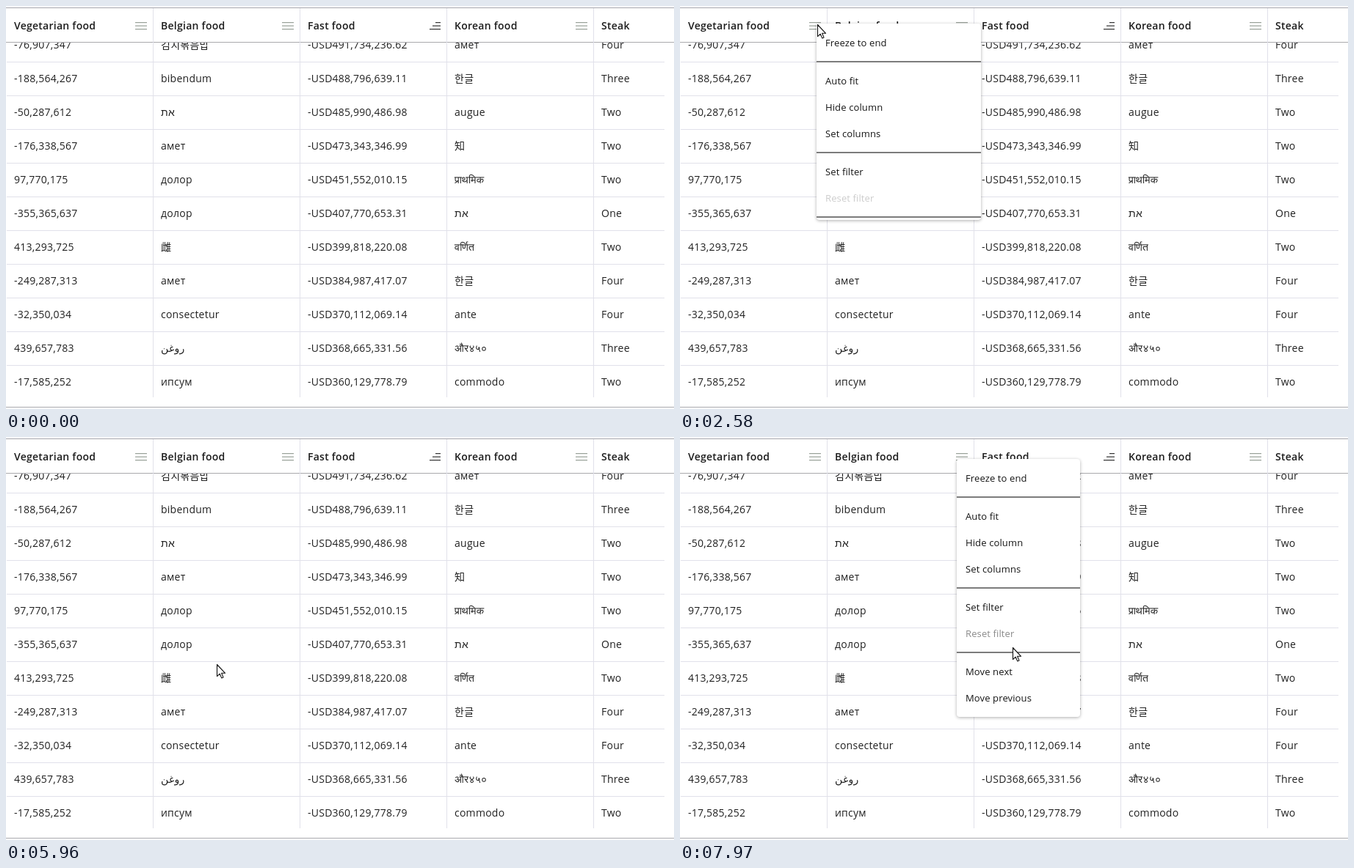
Animation, 910 px wide and 550 px high, one loop 8 s. Source, as an HTML page:

```html
<!DOCTYPE html>
<html lang="en">
<head>
<meta charset="utf-8">
<title>Column menu</title>
<style>
html, body { margin: 0; width: 100%; height: 100%; overflow: hidden; background: #fff; }
#stage {
  position: relative; width: 910px; height: 550px; overflow: hidden; background: #fff;
  font: 14px "Open Sans", "Noto Sans", "Noto Sans CJK KR", "Noto Sans CJK", sans-serif;
  letter-spacing: .25px; color: #212121; white-space: pre;
}
#stage div, #stage svg { position: absolute; }
.edge { left: 0; width: 910px; height: 1px; background: #a9a9ad; }
.strip { left: 0; top: 0; width: 910px; height: 2px; background: #f5f5fb; }
.col { top: 3px; width: 1px; height: 531px; background: #e1e1ea; }
#body { left: 1px; top: 50px; width: 896px; height: 484px; overflow: hidden; }
.row { left: 0; width: 896px; height: 45px; border-bottom: 1px solid #e1e1ea; }
.cell, .head { line-height: 44px; }
.head { top: 5px; font-weight: 600; color: #1c1c1c; }
.menu {
  overflow: hidden; background: #fff; border-radius: 4px;
  box-shadow: 0 1px 4px rgba(0, 0, 0, .32);
  font-size: 13px; letter-spacing: .122px; color: #151515;
}
.item { left: 0; width: 100%; height: 36px; line-height: 36px; text-indent: 12px; }
.item span { display: inline; }
.item.hover { background: #f3f3f3; }
.off { color: #8a8a8a; }
.mark { background: #ffc107; text-indent: 0; }
.rule { left: 0; width: 100%; height: 2px; background: #7c7c7c; }
#cursor { left: 0; top: 0; width: 0; height: 0; }
#cursor svg { overflow: visible; }
#cursor path { fill: #fff; stroke: #111; stroke-width: 1.1; stroke-linejoin: round; }
</style>
</head>
<body>
<div id="stage">
  <div class="strip"></div>
  <div id="body"></div>
  <div class="edge" style="top:2px"></div>
  <div class="edge" style="top:49px"></div>
  <div class="edge" style="top:547px"></div>
</div>
<script>
const LOOP = 8000, REVEAL = 308, MENU_H = 352;
const stage = document.getElementById('stage');
const body = document.getElementById('body');

const heads = ['Vegetarian food', 'Belgian food', 'Fast food', 'Korean food', 'Steak'];
const rows = `-76,907,347|김치볶음밥|-USD491,734,236.62|амет|Four
-188,564,267|bibendum|-USD488,796,639.11|한글|Three
-50,287,612|את|-USD485,990,486.98|augue|Two
-176,338,567|амет|-USD473,343,346.99|知|Two
97,770,175|долор|-USD451,552,010.15|प्राथमिक|Two
-355,365,637|долор|-USD407,770,653.31|את|One
413,293,725|雌|-USD399,818,220.08|वर्णित|Two
-249,287,313|амет|-USD384,987,417.07|한글|Four
-32,350,034|consectetur|-USD370,112,069.14|ante|Four
439,657,783|روغن|-USD368,665,331.56|और४५०|Three
-17,585,252|ипсум|-USD360,129,778.79|commodo|Two`.split('\n').map(r => r.split('|'));

function add(parent, cls, style, text) {
  const el = document.createElement('div');
  el.className = cls;
  for (const k in style) el.style[k] = style[k] + 'px';
  if (text) el.textContent = text;
  parent.append(el);
  return el;
}

function addSvg(parent, left, top, inner) {
  parent.insertAdjacentHTML('beforeend',
    `<svg width="20" height="24" style="left:${left}px;top:${top}px">${inner}</svg>`);
  return parent.lastElementChild;
}

rows.forEach((cells, i) => {
  const row = add(body, 'row', { top: 46 * i - 19 });
  cells.forEach((text, c) => add(row, 'cell', { left: 200 * c + 10 }, text));
});

heads.forEach((text, c) => {
  add(stage, 'head', { left: 200 * c + 11 }, text);
  if (c) add(stage, 'col', { left: 200 * c });
  if (c === 4) return;
  const sorted = c === 2;
  const bars = [0, 1, 2].map(k => {
    const x = sorted ? 8 - 4 * k : 0;
    return `<rect x="${x}" y="${k * 4.5}" width="${(sorted ? 15 : 16) - x}" height="1.2"/>`;
  }).join('');
  addSvg(stage, 200 * c + (sorted ? 177 : 176), 22,
    `<g fill="${sorted ? '#333' : '#98a098'}">${bars}</g>`);
});

// '-' is a divider, '~' a disabled item, '*' a marked one
const common = ['Freeze to end', '-', 'Auto fit', 'Hide column', 'Set columns', '-',
  'Set filter', '~Reset filter', '-'];

function makeMenu(left, top, width, open, close, extra) {
  const el = add(stage, 'menu', { left, top, width });
  const items = [];
  let y = 8;
  for (const name of [...common, ...extra]) {
    if (name === '-') {
      add(el, 'rule', { top: y + 7 });
      y += 16;
      continue;
    }
    const off = name[0] === '~', marked = name[0] === '*';
    const item = add(el, off ? 'item off' : 'item', { top: y });
    const span = document.createElement('span');
    span.textContent = name.replace(/^[~*]/, '');
    if (marked) span.className = 'mark';
    item.append(span);
    items.push({ item, y, off });
    y += 36;
  }
  return { el, items, left, top, width, open, close };
}

const menus = [
  makeMenu(186, 24, 224, 2370, 5690, ['*Only show in first column', 'Move next']),
  makeMenu(377, 30, 168, 7420, LOOP, ['Move next', 'Move previous'])
];

const cursor = add(stage, '', {});
cursor.id = 'cursor';
const arrow = addSvg(cursor, 0, 0, '<path d="M.5 .5V16.6L4.2 13.2 6.7 18.9 9 17.9 6.6 12.3H11.6Z"/>');
const hand = addSvg(cursor, -7, 0, `<path d="M5.2 2C5.2 0 8.2 0 8.2 2V8.2C8.2 6.6 11 6.7 11 8.6
  C11.2 7.2 13.8 7.4 13.8 9.2C14.2 8.2 16.6 8.5 16.6 10.4V16Q16.6 19 14.8 22H7.4
  Q6.6 19.4 3 15.2Q.2 12 1.2 11Q2.6 9.8 5.2 12.8Z"/>
  <path d="M8.2 8V12M11 8.6V12M13.8 9.2V12" style="fill:none"/>`);

// time, x, y of the pointer tip
const path = [
  [490, 568, 523], [1190, 4, 42], [1330, 4, 40], [1820, 160, 24], [1890, 160, 24],
  [2170, 180, 24], [2380, 187, 25], [2720, 187, 25], [2930, 285, 312], [3000, 286, 312],
  [3340, 290, 331], [3540, 290, 331], [3605, 284, 322], [4340, 284, 322], [4820, 287, 316],
  [5080, 287, 316], [5280, 287, 310], [6370, 287, 310], [6925, 362, 49], [7000, 362, 49],
  [7140, 371, 36], [7250, 378, 31], [7640, 378, 31], [7920, 453, 287], [LOOP, 453, 287]
];

const clamp = v => Math.min(1, Math.max(0, v));
const smooth = v => v * v * (3 - 2 * v);

function tip(t) {
  const i = Math.max(1, path.findIndex(p => p[0] > t));
  const [t0, x0, y0] = path[i - 1], [t1, x1, y1] = path[i];
  const k = smooth(clamp((t - t0) / (t1 - t0)));
  return [x0 + (x1 - x0) * k, y0 + (y1 - y0) * k];
}

function drawMenu(m, t, x, y) {
  const age = Math.floor((t - m.open) / 70) * 70;
  const h = MENU_H * smooth(clamp(age / REVEAL));
  const alpha = 1 - clamp((t - m.close) / 140);
  const shown = h > 0 && alpha > 0;
  const ready = shown && t > m.open + REVEAL;
  const inside = x >= m.left && x < m.left + m.width;
  let hit = false;
  m.el.style.display = shown ? '' : 'none';
  m.el.style.height = h + 'px';
  m.el.style.opacity = alpha;
  for (const it of m.items) {
    const dy = y - m.top - it.y;
    const over = ready && inside && !it.off && dy >= 0 && dy < 36;
    it.item.classList.toggle('hover', over);
    it.item.style.opacity = h >= MENU_H ? 1 : clamp((h - it.y - 27) / 48);
    hit = hit || over;
  }
  return { shown, hit };
}

function render(t) {
  const [x, y] = tip(t);
  const states = menus.map(m => drawMenu(m, t, x, y));
  const open = states.some(s => s.shown);
  const onIcon = x % 200 > 174 && x % 200 < 194;
  const link = open ? states.some(s => s.hit) : y < 48 && !onIcon;
  cursor.style.display = t < 490 ? 'none' : '';
  cursor.style.transform = `translate(${Math.round(x)}px, ${Math.round(y)}px)`;
  arrow.style.display = link ? 'none' : '';
  hand.style.display = link ? '' : 'none';
}

const start = performance.now();
function frame() {
  render((performance.now() - start) % LOOP);
  requestAnimationFrame(frame);
}
frame();
</script>
</body>
</html>
```
